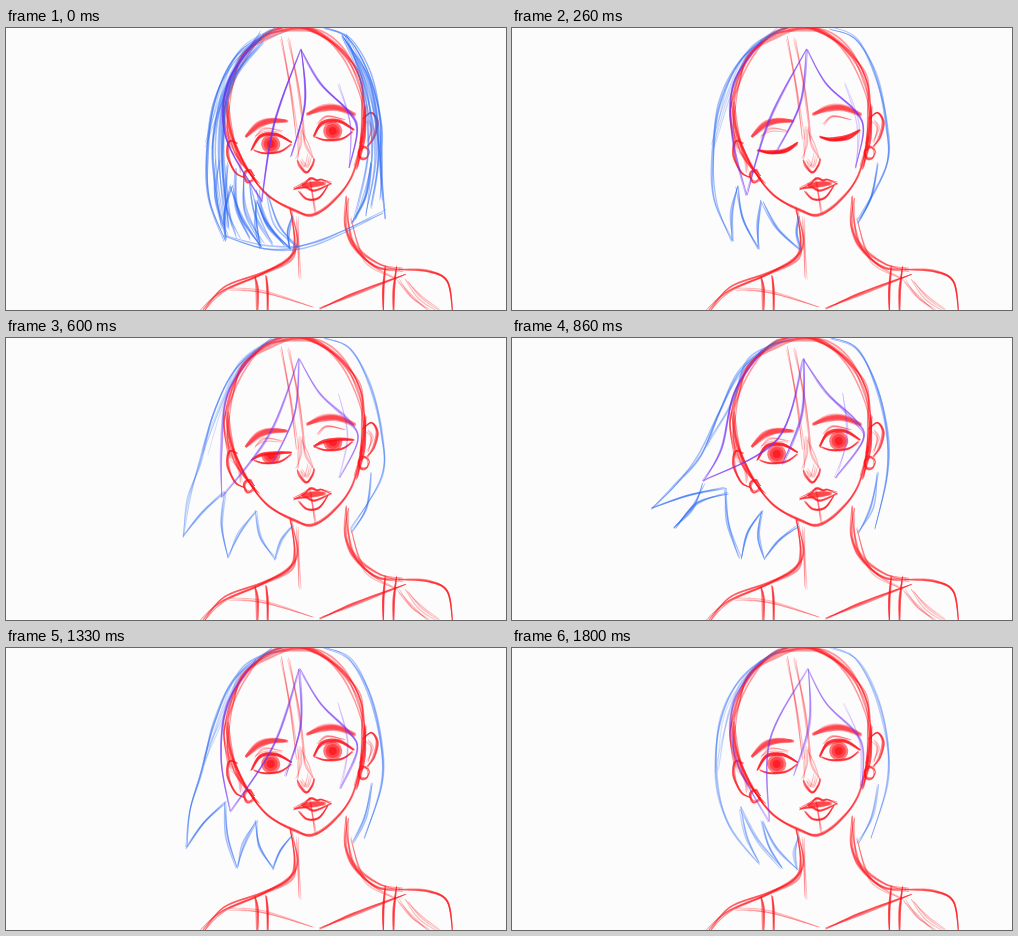
These frames come from a looping animation (500 px wide and 282 px high, 1.86 s). An HTML page with a canvas:

```html
<!DOCTYPE html>
<html lang="en">
<head>
<meta charset="utf-8">
<title>Wind in the hair</title>
<style>
html, body { margin: 0; width: 100%; height: 100%; overflow: hidden; background: #fcfcfc; }
canvas { display: block; width: 100vw; height: 100vh; }
</style>
</head>
<body>
<canvas width="500" height="282"></canvas>
<script>
const ctx = document.querySelector('canvas').getContext('2d');
const PAPER = '#fcfcfc', RED = '#ff1018', BLUE = '#2a68f5', VIOLET = '#7030f5';
const LOOP = 1860;

// Start of each held drawing and its place on the pose track.
const drawings = [[0, 0], [60, .5], [130, 1], [200, 1.45], [260, 1.88], [400, 2], [530, 2.5], [600, 3],
  [730, 3.5], [860, 4], [1060, 4.5], [1330, 5], [1460, 5.4], [1600, 5.75], [1800, 6]];

// Angles of wind, fringe and loose strand; x of lock, nape and side tips; ink; eyelid (2 = shut).
const poses = [
  [.20, .25, .09, 255, 284, 379, 1, 0],
  [.06, .34, .34, 271, 290, 362, .75, 1],
  [.21, .40, .28, 243, 288, 345, .85, 2],
  [.48, .51, .25, 222, 270, 345, .65, 1],
  [.78, .69, .19, 228, 253, 363, .85, 0],
  [.46, .45, .13, 231, 267, 359, .8, 0],
  [.02, .25, .13, 270, 285, 358, .6, 0]
];

let seed = 1;
const random = () => (seed = seed * 16807 % 2147483647) / 2147483647;
const jitter = spread => (random() - .5) * spread;
const swing = ([x, y], radius, angle) => [x - radius * Math.sin(angle), y + radius * Math.cos(angle)];

function poseAt(k) {
  const i = Math.min(Math.floor(k), poses.length - 2);
  return poses[i].map((v, n) => v + (poses[i + 1][n] - v) * (k - i));
}

// Three points from a to b; a positive bow bends a downward line to the right.
function arc(a, b, bow) {
  const dx = b[0] - a[0], dy = b[1] - a[1], n = bow / Math.hypot(dx, dy);
  return [a, [(a[0] + b[0]) / 2 + dy * n, (a[1] + b[1]) / 2 - dx * n], b];
}

// Smooth curve through the points, each moved a little.
function curve(points, spread = 0) {
  const p = points.map(([x, y]) => [x + jitter(spread), y + jitter(spread)]), out = [p[0]];
  for (let i = 0; i < p.length - 1; i++) {
    const a = p[i - 1] || p[i], b = p[i], c = p[i + 1], d = p[i + 2] || c;
    for (let t = .1; t < 1.05; t += .1)
      out.push([0, 1].map(n => b[n] + .5 * t * (c[n] - a[n]
        + t * (2 * a[n] - 5 * b[n] + 4 * c[n] - d[n] + t * (3 * (b[n] - c[n]) + d[n] - a[n])))));
  }
  return out;
}

function trace(points) {
  ctx.beginPath();
  points.forEach(p => ctx.lineTo(...p));
  ctx.closePath();
}

// Pencil line: several loose passes, thinner at both ends.
function sketch(color, alpha, width, passes, spread, points) {
  ctx.fillStyle = color;
  ctx.globalAlpha = alpha;
  while (passes--) {
    const line = curve(points, spread), last = line.length - 1, left = [], right = [];
    line.forEach(([x, y], i) => {
      const a = line[Math.max(i - 1, 0)], b = line[Math.min(i + 1, last)];
      const dx = b[0] - a[0], dy = b[1] - a[1];
      const r = width * (.2 + .3 * Math.sin(Math.PI * i / last)) / (Math.hypot(dx, dy) || 1);
      left.push([x - dy * r, y + dx * r]);
      right.unshift([x + dy * r, y - dx * r]);
    });
    trace(left.concat(right));
    ctx.fill();
  }
  ctx.globalAlpha = 1;
}
const line = (...points) => sketch(RED, .5, 1.8, 3, 2, points);
const rough = (...points) => sketch(RED, .45, 1.9, 5, 5, points);
const faint = (...points) => sketch(RED, .28, 1.3, 3, 4, points);
const soft = (...points) => sketch(RED, .3, 5.5, 4, 2.5, points);

function drawBody() {
  rough([286, 180], [290, 212], [284, 231], [256, 246], [218, 261], [196, 284]);
  rough([340, 168], [341, 198], [350, 221], [372, 238], [396, 242]);
  faint([292, 190], [294, 250]);
  faint([344, 190], [360, 232], [392, 252]);
  line([392, 242], [422, 243], [441, 254], [447, 284]);
  for (const x of [249, 260, 380, 391]) {
    const foot = x < 300 ? x + 2 : x - 3;
    line([x, x < 300 ? 248 : 238], [foot, 262], [foot, 284]);
  }
  faint([222, 261], [258, 264], [308, 278]);
  line([314, 281], [348, 266], [400, 247]);
  for (const x of [391, 400]) faint([x, 252], [x + 14, 269], [x + 32, 282]);
}

function drawHead() {
  // skull: a tilted oval in loose passes, then the firmer jaw
  const skull = [];
  for (let a = 2.75; a < 6.7; a += .39) skull.push([289 + 69 * Math.cos(a), 86 + 86 * Math.sin(a)]);
  sketch(RED, .42, 1.9, 7, 6, skull);
  rough([221, 75], [224, 103], [235, 132], [252, 156]);
  rough([358, 78], [357, 108], [350, 140]);
  line([227, 111], [240, 140], [262, 167], [290, 183], [307, 187], [327, 174], [346, 148], [357, 108]);
  for (const x of [275, 282]) faint([x, 10], [x + 9, 60], [x + 17, 112]);
  faint([303, 150], [309, 187]);
  // ears and earrings
  line([232, 115], [223, 114], [222, 128], [229, 144], [238, 150]);
  line([357, 91], [365, 85], [371, 94], [368, 109], [361, 119]);
  faint([226, 120], [232, 131], [235, 144]);
  faint([361, 93], [366, 101], [361, 114]);
  for (const [x, y] of [[243, 148], [358, 125]]) {
    const ring = [];
    for (let a = 0; a < 7; a += .8) ring.push([x + 5 * Math.cos(a), y + 6 * Math.sin(a)]);
    line(...ring);
  }
  // brows
  soft([239, 109], [252, 98], [265, 93], [281, 93]);
  soft([301, 87], [317, 80], [332, 80], [349, 87]);
  // nose and mouth
  line([291, 132], [294, 139], [301, 144], [306, 138], [308, 131]);
  faint([293, 99], [294, 116], [291, 132]);
  faint([297, 100], [301, 117], [307, 132]);
  faint([295, 131], [300, 138], [304, 127]);
  line([288, 161], [298, 155], [305, 150], [311, 153], [315, 151], [325, 155]);
  line([288, 161], [300, 160], [308, 162], [325, 155]);
  line([293, 163], [301, 171], [313, 170], [322, 158]);
  soft([295, 158], [306, 156], [319, 155]);
}

function drawEye(x, y, shut) {
  const lidY = 8.5 * shut - 11;
  const lid = [[-20, 1], [-9, lidY], [7, lidY], [21, 0]], lower = [[-18, 2], [-8, 6.5], [8, 6.5], [20, 1]];
  ctx.save();
  ctx.translate(x, y);
  ctx.rotate(-.14);
  ctx.save();
  trace(curve(lid).concat(curve(lower).reverse()));
  ctx.clip();
  ctx.fillStyle = RED;
  for (const [radius, alpha] of [[9.5, .55], [7, .5], [4, .7]]) {
    ctx.globalAlpha = alpha;
    ctx.beginPath();
    ctx.arc(0, shut - 2, radius, 0, 7);
    ctx.fill();
  }
  ctx.restore();
  sketch(RED, .55, 3, 3, 1.8, lid);
  line(...lower);
  faint([-15, -11], [-3, -17], [14, -13]);
  ctx.restore();
}

function drawHair(k, pose) {
  const [wind, fringe, strand, lockX, napeX, sideX, ink] = pose;
  const part = [296 - 6 * wind, 21], pivot = [250, 60];
  const blue = (...points) => sketch(BLUE, ink * .5, 1.5, 3, 3, points);
  const violet = (...points) => sketch(VIOLET, ink * .5, 1.5, 3, 2, points);

  // outer edge trails behind the wind, then a zigzag of locks
  const tip = swing(pivot, 156, wind);
  blue([266, 1], [229, 31], [208, 75], swing(pivot, 85, .55 + .35 * wind),
    swing(pivot, 122, .26 + .68 * wind), tip);
  sketch(BLUE, ink * .3, 1.5, 4, 8, [[278, 0], [240, 20], [217, 62], swing(pivot, 75, .62 + .3 * wind)]);
  const zigzag = [tip, [229 - 20 * wind, 160 - 13 * wind], [lockX, 220], [250, 173], [napeX, 221], [286, 188]];
  zigzag.slice(1).forEach((p, i) => blue(...arc(zigzag[i], p, i % 2 ? -5 : 3)));
  if (wind > .6) {
    const gust = swing(pivot, 157, .755 * wind);
    blue(...arc([192, 146], gust, 4));
    blue(...arc(gust, [217, 155], 8));
  }
  blue([318, 0], [344, 11], [364, 48], [375, 96], [375, 138], [sideX, 190]);
  blue([366, 135], [360, 169], [346, 195]);

  // the full bob before the wind takes it
  const full = Math.max(0, 1 - k);
  if (full) {
    const bob = (...points) => sketch(BLUE, .4 * full, 1.6, 3, 5, points);
    for (let i = 0; i < 7; i++) bob(...arc([212 + 8 * i, 130 + 6 * i], [220 + 12 * i, 208 + 2 * i], -6));
    for (let i = 0; i < 4; i++) {
      bob([256, 5 + 3 * i], [222 + i, 55], [208 + 3 * i, 120], [217 + 2 * i, 200]);
      bob([338, 8], [364 - 3 * i, 55], [376 - 4 * i, 125], [376 - 9 * i, 172 + 7 * i]);
    }
    bob([219, 208], [262, 220], [310, 216], [379, 184]);
  }

  const fringeTip = swing(part, 158, fringe), bangTip = [350 - 34 * wind, 140];
  violet(...arc(part, fringeTip, 65 * wind - 20));
  violet(fringeTip, [224 - 18 * wind, 110], [222, 55], [250, 12]);
  violet(...arc(part, swing(part, 108, strand), 9));
  violet(part, [314, 55], [342, 82], [351, 102], bangTip);
  sketch(VIOLET, ink * .3, 1.2, 2, 3, arc([332, 55], bangTip, 8));
}

function draw(time) {
  const index = drawings.filter(d => d[0] <= time).length - 1;
  const k = drawings[index][1], pose = poseAt(k), shut = pose[7];
  ctx.fillStyle = PAPER;
  ctx.fillRect(0, 0, 500, 282);
  seed = 4211;
  drawBody();
  drawHead();
  drawEye(265, 118, shut);
  drawEye(327, 105, shut);
  seed = 977 + index * 7919;
  drawHair(k, pose);
}

const start = performance.now();
function tick() {
  draw((performance.now() - start) % LOOP);
  requestAnimationFrame(tick);
}
tick();
</script>
</body>
</html>
```
